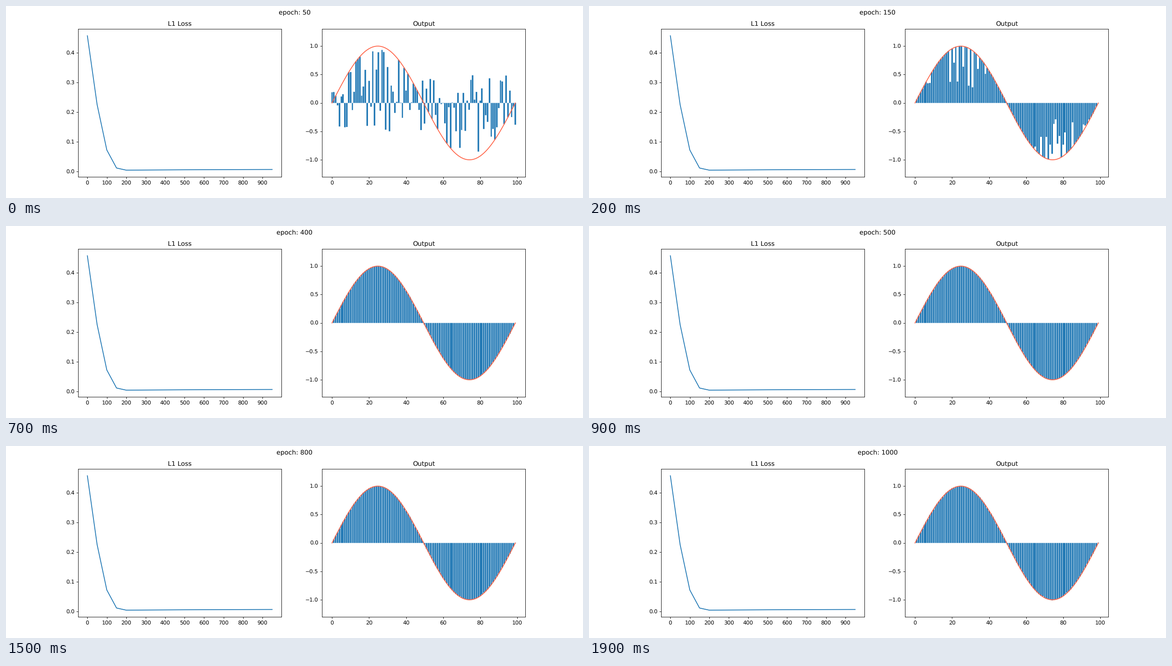
Animation of 1280x427 px, one loop 2 s. Source, as a matplotlib script:

```python
import matplotlib.pyplot as plt
import numpy as np
from matplotlib.animation import FuncAnimation

FRAMES, INTERVAL = 20, 100
STEP = 50                        # epochs per frame
N = 100
GRID = 1500 / 1280               # bar edges sit on a slightly finer pixel grid

plt.rcParams["text.hinting"] = "none"
rng = np.random.default_rng(5)
x = np.arange(N)
goal = np.sin(2 * np.pi * x / (N - 1))
weights = rng.uniform(-.8, .8, N)
drift = rng.normal(0, .005, N)


def output(frame):
    """Every bar walks to its goal at one shared, slowly rising speed."""
    reach = .3 + .35 * frame + .0185 * frame ** 2
    wobble = drift * max(0, frame - 2) / FRAMES
    return weights + np.clip(goal - weights, -reach, reach) + wobble


def snap(ax, data_x):
    """Move x positions to the nearest line of the finer grid."""
    points = np.column_stack([data_x, np.zeros(len(data_x))])
    pixels = ax.transData.transform(points)
    pixels[:, 0] = np.floor(pixels[:, 0] * GRID + .5) / GRID
    return ax.transData.inverted().transform(pixels)[:, 0]


fig, (left, right) = plt.subplots(1, 2, figsize=(15, 427 * 3 / 256),
                                  dpi=256 / 3)
title = fig.suptitle("")

left.set_title("L1 Loss")
epochs = np.arange(0, 1000, STEP)
left.plot(epochs, np.interp(epochs, [0, 50, 100, 150, 200, 500, 950],
                            [.457, .226, .0728, .0122, .005, .0063, .0073]))
left.set_xticks(range(0, 1000, 100))
left.set_yticks(np.arange(5) / 10)

right.set_title("Output")
margin = .4 + .05 * (N - .2)
right.set_xlim(-margin, N - 1 + margin)
right.set_ylim(-1.3, 1.3)
right.set_xticks(range(0, 101, 20))
right.set_yticks(np.arange(-2, 3) / 2)
starts, ends = snap(right, x - .4), snap(right, x + .4)
bars = right.bar(starts, goal, ends - starts, align="edge", snap=False)
right.plot(x, goal, color="tomato")


def draw(frame):
    title.set_text(f"epoch: {STEP * (frame + 1)}")
    for bar, height in zip(bars, output(frame)):
        bar.set_height(height)
    return [title, *bars]


anim = FuncAnimation(fig, draw, frames=FRAMES, interval=INTERVAL,
                     init_func=lambda: draw(0), repeat=True, repeat_delay=0)
plt.show()
```
